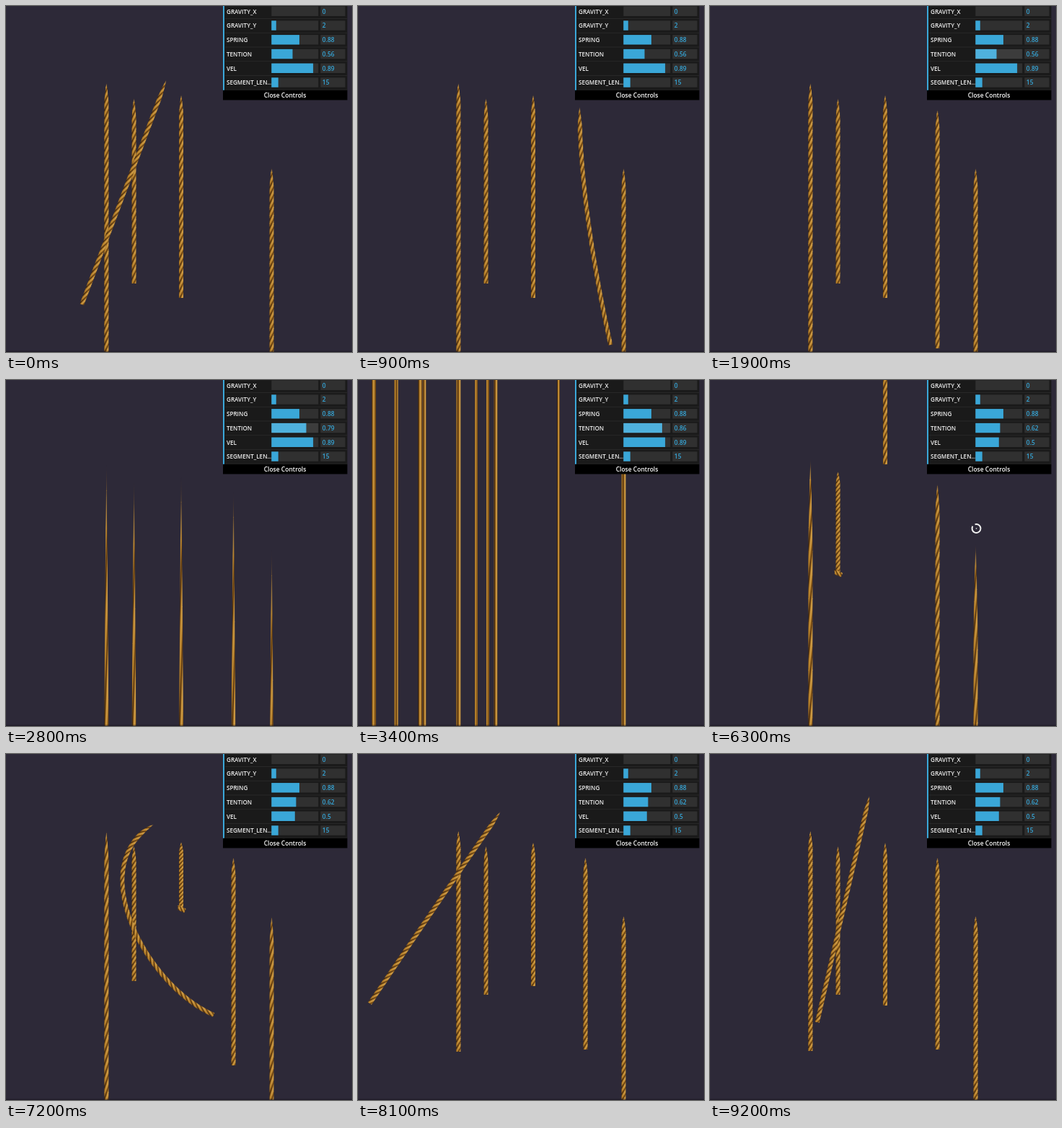
Animation of 480x480 px, one loop 9300 ms. Source, as an HTML page with a canvas:

```html
<!DOCTYPE html>
<html lang="en">
<head>
<meta charset="utf-8">
<title>Ropes</title>
<style>
html, body { margin: 0; width: 100%; height: 100%; overflow: hidden; background: #2d2938; }
canvas, svg { position: absolute; left: 0; top: 0; width: 480px; height: 480px; display: block; }
text { font: 600 8.1px "Open Sans", "Noto Sans", sans-serif; fill: #f2f2f2; }
.num { font-size: 8.5px; fill: #35a6d8; }
.close { font-size: 8.5px; text-anchor: middle; fill: #fff; }
</style>
</head>
<body>
<canvas id="stage" width="480" height="480"></canvas>
<svg id="panel" viewBox="0 0 480 480"></svg>
<script>
const LOOP = 9300, STEP = 100;
const ctx = document.getElementById('stage').getContext('2d');
const panel = document.getElementById('panel');
const clamp = (v, a = 0, b = 1) => Math.min(b, Math.max(a, v));
const mix = (a, b, k) => a + (b - a) * k;
const ramp = (t, from, to) => clamp((t - from) / (to - from));
const smooth = k => k * k * (3 - 2 * k);
const noise = i => { const s = Math.sin(i * 12.9898) * 43758.5453; return s - Math.floor(s); };

// ---- rope texture: twisted strands with a tapered head ----
const TEX_W = 14, RES = 2, TEX_LEN = 420, TWIST = 9, TAPER = 22, ROPE_W = 6.6;
const GOLD = [[50, 31, 14], [122, 78, 22], [182, 128, 42], [228, 184, 102]];

function gold(b) {
  const p = clamp(b) * 2.999, i = Math.floor(p);
  return GOLD[i].map((v, c) => mix(v, GOLD[i + 1][c], p - i));
}

function makeTexture() {
  const tex = document.createElement('canvas');
  tex.width = TEX_W;
  tex.height = TEX_LEN * RES;
  const c = tex.getContext('2d'), img = c.createImageData(tex.width, tex.height);
  for (let y = 0, o = 0; y < tex.height; y++) {
    const v = y / RES, half = Math.pow(clamp(v / TAPER), 0.7);
    for (let i = 0; i < TEX_W; i++, o += 4) {
      const x = (i + 0.5) / TEX_W * 2 - 1;
      const strand = Math.abs(Math.sin(Math.PI * (v / TWIST + x * 0.6)));
      const light = strand * 0.7 + 0.1 + x * 0.14 - x * x * 0.08;
      const edge = clamp((half - Math.abs(x)) * 5);
      img.data.set([...gold(light), 255 * edge * clamp(v / 6)], o);
    }
  }
  c.putImageData(img, 0, 0);
  return tex;
}
const tex = makeTexture();

// lays the texture along a path, stretched from its rest length
function drawRope(pts, rest) {
  const len = pts.slice(1).map((p, i) => Math.hypot(p[0] - pts[i][0], p[1] - pts[i][1]));
  const total = len.reduce((a, b) => a + b, 0);
  if (total < 2) return;
  const used = Math.min(rest, total / 0.65);
  let v = 0;
  len.forEach((l, i) => {
    if (!l) return;
    const [x, y] = pts[i], [x2, y2] = pts[i + 1];
    const span = l / total * used, n = Math.ceil(span / 3), dv = span / n, dl = l / n;
    ctx.save();
    ctx.translate(x, y);
    ctx.rotate(Math.atan2(y2 - y, x2 - x) - Math.PI / 2);
    for (let s = 0; s < n; s++) {
      ctx.drawImage(tex, 0, (v + s * dv) * RES, TEX_W, dv * RES,
        -ROPE_W / 2, s * dl, ROPE_W, dl + 0.5);
    }
    ctx.restore();
    v += span;
  });
}

// a rope pulled so far that it is one even streak
function drawBand(x, w, v) {
  ctx.drawImage(tex, 0, Math.round(v * RES), TEX_W, 1, x - w / 2, 0, w, 480);
}

// ---- hanging ropes: `kick` is the extra stretch at 6300 ms, `tau` how fast it settles ----
const ropes = [
  { x: 139.3, y: 105, rest: 306, kick: 4.5, tau: 675, back: 5000, band: true },
  { x: 177.5, y: 126, rest: 208, kick: -0.33, tau: 800, back: 4000 },
  { x: 243, y: 121, rest: 228, kick: -1.02, tau: 1235, back: 5000 },
  { x: 315.5, y: 142, rest: 267, kick: 0.8, tau: 600, back: 5000, from: 1900 },
  { x: 368.5, y: 223, rest: 300, kick: 4.6, tau: 675, back: 5000, band: true }
];

function stretch(r, t) {
  if (t < 3000) return 1.245 * Math.exp(4 * ramp(t, 2000, 3000) ** 2);
  const w = (t - 6300) / r.tau;
  return 1 + r.kick * Math.exp(-w * Math.abs(w));
}

function drawHanging(r, t) {
  if (t < (r.from || 0)) return;
  if (t >= 3000 && t < r.back) {
    if (r.band) drawBand(r.x, ROPE_W, 39.8 + (t - 4600) / 400);
    return;
  }
  const s = stretch(r, t), tail = r.y + r.rest * s, pts = [[r.x, r.y]];
  // slack rope flies up above its anchor before it falls
  if (s < 0.4) pts.push([r.x, r.y - r.rest * 1.6 * (0.4 - s)]);
  pts.push([r.x, tail]);
  if (s > 0.1 && s < 0.75) pts.push([r.x - 4, tail + 1], [r.x + 5, tail + 5]);
  drawRope(pts, r.rest);
}

// ---- the dragged rope: a swinging chord with a sideways bow ----
function drawCurve(x, y, len, angle, bow, rest) {
  const dx = Math.sin(angle), dy = Math.cos(angle);
  const on = (along, side) => [x + dx * along - dy * side, y + dy * along + dx * side];
  const c = [[x, y], on(len / 3 - bow * 0.62, bow),
    on(len * 2 / 3 + bow * 0.22, bow * 0.7), on(len, 0)];
  const pts = [];
  for (let i = 0; i <= 50; i++) {
    const k = i / 50, q = 1 - k;
    const w = [q * q * q, 3 * q * q * k, 3 * q * k * k, k * k * k];
    pts.push([0, 1].map(a => w.reduce((sum, v, j) => sum + v * c[j][a], 0)));
  }
  drawRope(pts, rest);
}

function drawDrag(t) {
  if (t < 1900) {
    const k = smooth(ramp(t, 0, 1100)), turn = t / 1300 * 2 * Math.PI;
    const angle = -0.36 * Math.exp(-t / 700) * (Math.cos(turn) + Math.sin(turn));
    drawCurve(mix(223, 315.5, k), mix(101, 142, k), 334, angle, 50 * Math.sin(Math.PI * k), 267);
  } else if (t >= 6600) {
    const u = (t - 7200) / 2000;
    const angle = -0.227 + 0.526 * Math.exp(-0.6 * u) * Math.cos(u * 2.5 * Math.PI);
    const bow = 112 * Math.exp(-((u * 5) ** 2));
    drawCurve(206 + 15.5 * u + 25 * Math.sin(u * 4 * Math.PI), 97 - 40 * u,
      323 - bow * 0.41, angle, bow, 323);
  }
}

// streaks of the ropes thrown about
const strays = [22, 53, 86, 92, 164, 180, 191, 278];

function drawStrays(t) {
  if (t < 3000 || t >= 4000) return;
  const s = (t - 3400) / 100;
  strays.forEach((x, i) => {
    if (s > 2 && i % 4 > 6 - s) return;
    drawBand(x + s * 18 * (noise(i + 1) - 0.5), 4 + 3 * noise(i + 20), 36 + TWIST * noise(i + 40) + s * 0.5);
  });
}

function drawCursor(t) {
  if (t < 6100 || t >= 6500) return;
  const x = 369 - (t - 6300) * 0.14, y = 206 - Math.abs(t - 6300) * 0.3;
  ctx.strokeStyle = ctx.fillStyle = '#f2f2f2';
  ctx.lineWidth = 2;
  ctx.beginPath();
  ctx.arc(x + 0.5, y, 6, -1.9, 3.7);
  ctx.stroke();
  ctx.fillRect(x - 0.2, y - 0.7, 1.4, 1.4);
}

// ---- control panel ----
function add(tag, attrs, label) {
  const el = document.createElementNS('http://www.w3.org/2000/svg', tag);
  for (const k in attrs) el.setAttribute(k, attrs[k]);
  if (label !== undefined) el.textContent = label;
  return panel.appendChild(el);
}
const box = (x, y, width, height, fill) => add('rect', { x, y, width, height, fill });

const ROW = 19.75, BAR = 65, BLUE = '#3aa7d8';
box(301, 0, 172.5, 117, '#1a1a1a');
const rows = [
  ['GRAVITY_X', '0', 0], ['GRAVITY_Y', '2', 0.1], ['SPRING', '0.88', 0.595],
  ['TENTION', '0.56', 0.45], ['VEL', '0.89', 0.89], ['SEGMENT_LEN...', '15', 0.145]
].map(([name, num, part], i) => {
  const y = 0.6 + i * ROW;
  box(304, y + 16.5, 169.5, 0.8, '#2c2c2c');
  add('text', { x: 306, y: y + 10 }, name);
  const track = box(368.3, y, BAR, 13.4, '#303030');
  const fill = box(368.3, y, BAR * part, 13.4, BLUE);
  box(436.3, y, 34.3, 13.4, '#303030');
  return { track, fill, num: add('text', { x: 438.8, y: y + 10, class: 'num' }, num) };
});
box(301, 0, 2, 117, BLUE);
box(301, 116.8, 172.5, 13.7, '#000');
add('text', { x: 387, y: 126.6, class: 'close' }, 'Close Controls');

function setRow(row, value, min, hover) {
  row.fill.setAttribute('width', BAR * (value - min) / (1 - min));
  row.fill.setAttribute('fill', hover ? '#4fb1dd' : BLUE);
  row.track.setAttribute('fill', hover ? '#3c3c3c' : '#303030');
  row.num.textContent = String(+value.toFixed(2));
}

function drawPanel(t) {
  const tention = 0.56 + 0.3 * ramp(t, 2100, 3000) - 0.24 * ramp(t, 3600, 4400);
  const vel = 0.89 - 0.39 * ramp(t, 5000, 5800);
  setRow(rows[3], tention, 0.2, t >= 1700 && t < 4500);
  setRow(rows[4], vel, 0, t >= 4500 && t < 6100);
}

// ---- main loop ----
function render(t) {
  ctx.fillStyle = '#2d2938';
  ctx.fillRect(0, 0, 480, 480);
  ropes.forEach(r => drawHanging(r, t));
  drawStrays(t);
  drawDrag(t);
  ctx.fillStyle = 'rgba(20, 17, 26, 0.5)';
  ctx.fillRect(0, 478.5, 480, 1.5);
  drawCursor(t);
  drawPanel(t);
}

const start = performance.now();
let last = -1;
function tick() {
  const t = Math.floor((performance.now() - start) % LOOP / STEP) * STEP;
  if (t !== last) render(last = t);
  requestAnimationFrame(tick);
}
tick();
</script>
</body>
</html>
```
